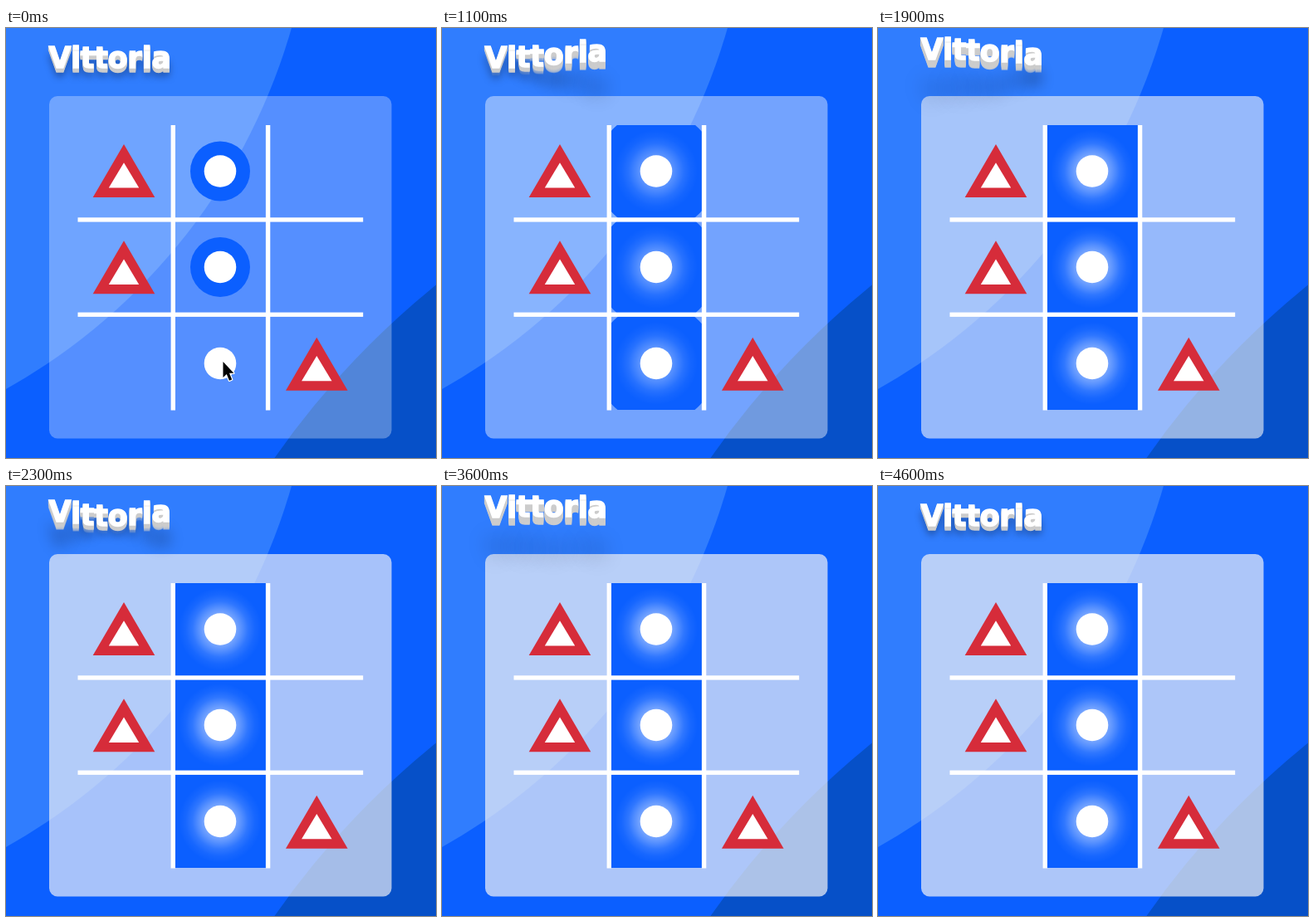
Animation of 518 by 518 pixels, one loop 4.7 s. Source, as an HTML page with a canvas:

```html
<!DOCTYPE html>
<html lang="it">
<head>
<meta charset="utf-8">
<title>Vittoria</title>
<style>
  html, body { margin: 0; width: 100%; height: 100%; overflow: hidden; background: #0b5fff; }
  canvas { display: block; }
</style>
</head>
<body>
<canvas id="stage" width="518" height="518"></canvas>
<script>
const ctx = document.getElementById('stage').getContext('2d');
const SIZE = 518, LOOP = 4700, STEP = 100;
const BLUE = '#0b5fff', RED = '#d62c3a';
const COL = 258, ROWS = [172.5, 288, 404];
const TRIANGLES = [[142, 140], [142, 256.3], [374.3, 372.7]];
const WORD = 'Vittoria', FONT = 'bold 34.7px "DejaVu Sans", sans-serif';
const LEFT = 51.5, BASE = 48.3, LIFT = 11, LAG = 0.04, BOUNCES = 8;
// time in ms and the bounce count reached by the first letter
const BEATS = [[0, 0], [700, 1.42], [1500, 2.65], [2300, 4.14], [2900, 5.42], [3600, 6.65], [4180, 8], [4700, 9]];

const clamp = (v, lo, hi) => Math.min(hi, Math.max(lo, v));
const mix = (a, b, k) => a + (b - a) * k;
const ramp = (t, from, to) => clamp((t - from) / (to - from), 0, 1);

// cubic-bezier(.25, .1, .25, 1)
function ease(x) {
  const curve = (s, a, b) => 3 * s * (1 - s) * (1 - s) * a + 3 * s * s * (1 - s) * b + s * s * s;
  let lo = 0, hi = 1;
  for (let i = 0; i < 20; i++) {
    const mid = (lo + hi) / 2;
    if (curve(mid, 0.25, 0.25) < x) lo = mid; else hi = mid;
  }
  return curve(lo, 0.1, 1);
}

function beatAt(t) {
  const i = BEATS.findIndex(b => b[0] > t);
  const [t0, b0] = BEATS[i - 1], [t1, b1] = BEATS[i];
  return mix(b0, b1, (t - t0) / (t1 - t0));
}

function disc(x, y, r, fill) {
  ctx.fillStyle = fill;
  ctx.beginPath();
  ctx.arc(x, y, r, 0, Math.PI * 2);
  ctx.fill();
}

function poly(points, fill) {
  ctx.fillStyle = fill;
  ctx.beginPath();
  points.forEach(([x, y]) => ctx.lineTo(x, y));
  ctx.closePath();
  ctx.fill();
}

function background() {
  ctx.fillStyle = BLUE;
  ctx.fillRect(0, 0, SIZE, SIZE);
  disc(-356, -200, 728, '#307dfe');
  disc(1154, 1098, 1013, '#0650c8');
}

function board(t) {
  const k = ramp(t, 400, 2450);
  const rg = mix(255, 243, k), b = mix(255, 247, k);
  ctx.fillStyle = `rgba(${rg}, ${rg}, ${b}, ${mix(0.3, 0.7, k)})`;
  ctx.beginPath();
  ctx.roundRect(52, 82, 412.5, 412.5, 10);
  ctx.fill();
}

function circleCell(y, r, glow) {
  disc(COL, y, r, BLUE);
  if (glow > 0) {
    const g = ctx.createRadialGradient(COL, y, 17, COL, y, 50);
    [[0, 0.48], [0.25, 0.32], [0.5, 0.15], [0.75, 0.05], [1, 0]].forEach(
      ([at, a]) => g.addColorStop(at, `rgba(255, 255, 255, ${a * glow})`));
    disc(COL, y, 50, g);
  }
  disc(COL, y, 19.3, '#fff');
}

function circles(t) {
  const win = ramp(t, 800, 1200);
  ROWS.forEach((y, i) => {
    const ring = i === 2 ? mix(18, 36, ramp(t, 0, 300)) : 36;
    ctx.save();
    ctx.beginPath();
    ctx.rect(203, 117 + i * 114.3, 110.5, 114.5);
    ctx.clip();
    circleCell(y, mix(ring, 85, win), win);
    ctx.restore();
  });
}

function triangle([x, y]) {
  poly([[x, y], [x + 37.3, y + 64], [x - 37.3, y + 64]], RED);
  poly([[x, y + 22.3], [x + 18.2, y + 52.6], [x - 18.2, y + 52.6]], '#fff');
}

function grid() {
  ctx.fillStyle = '#fff';
  for (const d of [0, 114.3]) {
    ctx.fillRect(198.6 + d, 117, 5.4, 343.5);
    ctx.fillRect(86.5, 228.3 + d, 343.7, 5.3);
  }
}

function cursor(x, y) {
  ctx.save();
  ctx.translate(x, y);
  ctx.lineJoin = 'round';
  ctx.strokeStyle = '#fff';
  ctx.lineWidth = 2.4;
  const arrow = [[0.5, 1], [0.5, 20], [4.8, 16], [8, 23.8], [11.2, 22.4], [8, 14.8], [13.4, 14.8]];
  poly(arrow, '#000');
  ctx.stroke();
  poly(arrow, '#000');
  ctx.restore();
}

function glyph(l, y, color) {
  ctx.fillStyle = ctx.strokeStyle = color;
  ctx.fillText(l.ch, l.x, y);
  ctx.strokeText(l.ch, l.x, y);
}

function castShadow(l) {
  const away = 2000;
  ctx.save();
  ctx.shadowColor = `rgba(0, 0, 0, ${mix(0.4, 0.2, l.up)})`;
  ctx.shadowBlur = mix(10, 25, l.up);
  ctx.shadowOffsetY = away + mix(10, 50, l.up);
  ctx.fillText(l.ch, l.x, l.y - away);
  ctx.restore();
}

function letter(l) {
  for (let d = 9; d > 0; d--) {
    ctx.globalAlpha = d > 5 ? l.up : 1;
    glyph(l, l.y + d, '#ccc');
  }
  ctx.globalAlpha = 1;
  glyph(l, l.y, '#fff');
}

function title(t) {
  ctx.font = FONT;
  ctx.lineWidth = 1.4;
  ctx.lineJoin = 'miter';
  const beat = beatAt(t);
  const letters = [...WORD].map((ch, i) => {
    const n = clamp(beat - i * LAG, 0, BOUNCES);
    const up = ease(1 - Math.abs(2 * (n % 1) - 1));
    return { ch, up, x: LEFT + ctx.measureText(WORD.slice(0, i)).width, y: BASE - LIFT * up };
  });
  ctx.fillStyle = '#000';
  letters.forEach(castShadow);
  letters.forEach(letter);
}

function draw(t) {
  background();
  board(t);
  circles(t);
  TRIANGLES.forEach(triangle);
  grid();
  title(t);
  if (t < 1000) cursor(261, 401);
}

const start = performance.now();
function tick() {
  const t = (performance.now() - start) % LOOP;
  draw(Math.floor(t / STEP) * STEP);
  requestAnimationFrame(tick);
}
tick();
</script>
</body>
</html>
```
